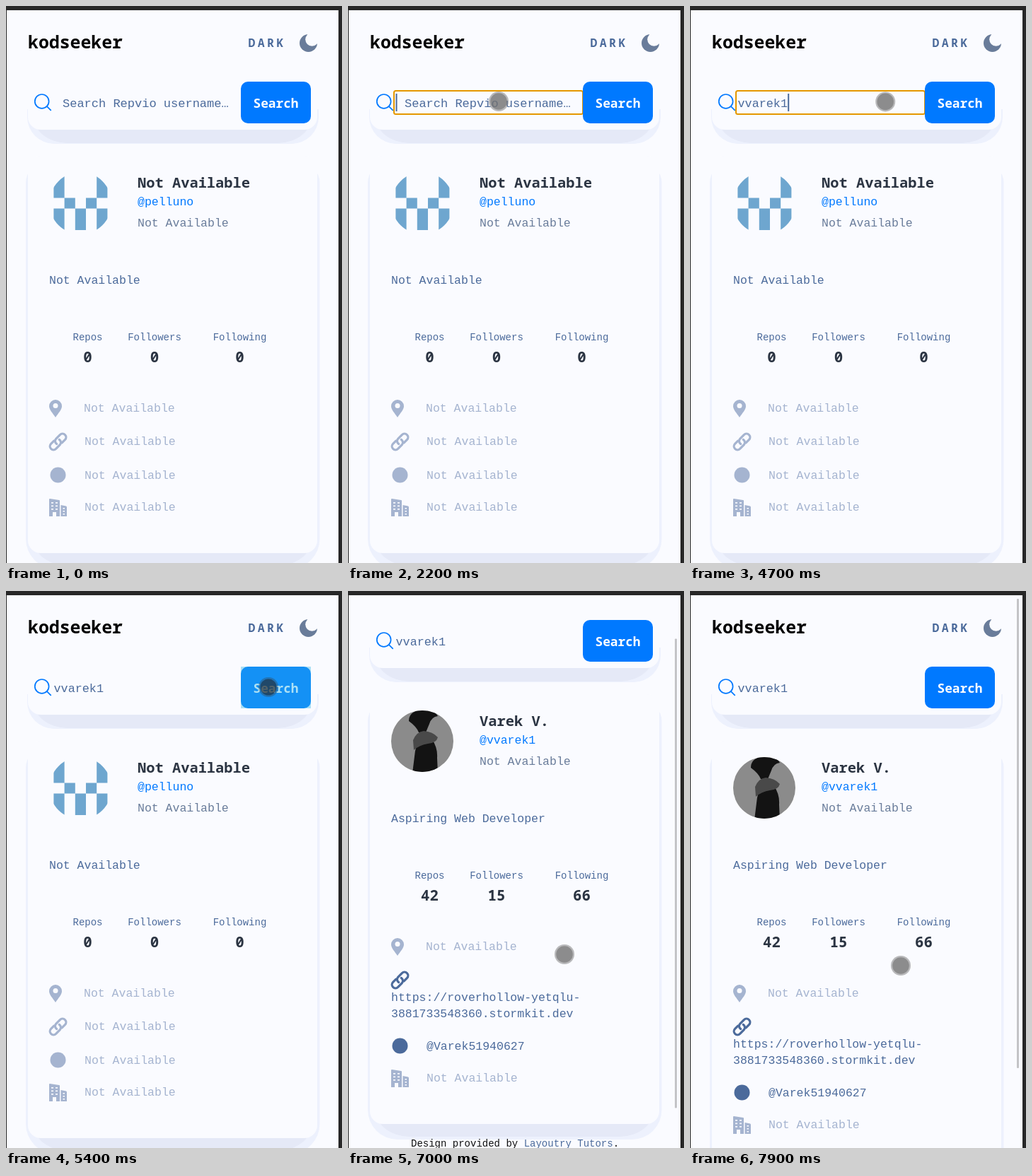
An HTML page with a canvas that plays this animation: 475x788 px, repeating every 8000 ms.

```html
<!DOCTYPE html>
<html lang="en">
<head>
<meta charset="utf-8">
<title>Profile search</title>
<style>
  html, body { margin: 0; width: 100%; height: 100%; overflow: hidden; background: #fafbff; }
  canvas { display: block; }
</style>
</head>
<body>
<canvas id="stage" width="475" height="788"></canvas>
<script>
const ctx = document.getElementById('stage').getContext('2d');
const LOOP = 8000, STEP = 100;
const MONO = '"Liberation Mono", "DejaVu Sans Mono", monospace';
const BOLD = '"Noto Sans Mono", "DejaVu Sans Mono", monospace';
const C = {
  page: '#fafbff', frame: '#272727', blue: '#0079ff', slate: '#4b6a9b', grey: '#697c9a',
  dim: '#a5b4d0', ink: '#2b3442', halo: '#edf1fd', shade: '#e5e9f7', focus: '#e59700'
};
const HANDLE = 'vvarek1';

// Keyed tracks: time followed by values
const POINTER = [
  [600, 421, 411], [1300, 299, 203], [1400, 233, 138], [1500, 219, 134], [1600, 205, 131],
  [1700, 213, 135], [4500, 213, 135], [5000, 371, 136], [6300, 371, 136], [6400, 271, 190],
  [6800, 306, 514], [7400, 306, 514], [7600, 298, 530]
];
const SCROLL = [[6700, 0], [6800, 14], [7200, 118], [7400, 118], [7500, 42], [7600, 0]];

function sample(track, t) {
  if (t <= track[0][0]) return track[0].slice(1);
  for (let i = 1; i < track.length; i++) {
    const a = track[i - 1], b = track[i];
    if (t <= b[0]) {
      const k = (t - a[0]) / (b[0] - a[0]);
      return a.slice(1).map((v, j) => v + (b[j + 1] - v) * k);
    }
  }
  return track[track.length - 1].slice(1);
}

const within = (t, a, b) => t >= a && t < b;

function text(str, x, y, size, color, weight = 400, align = 'left') {
  ctx.font = `${weight} ${size}px ${weight > 400 ? BOLD : MONO}`;
  ctx.textAlign = align;
  ctx.fillStyle = color;
  ctx.fillText(str, x, y);
}

function rect(x, y, w, h, color) {
  ctx.fillStyle = color;
  ctx.fillRect(x, y, w, h);
}

function round(x, y, w, h, r, color) {
  ctx.fillStyle = color;
  ctx.beginPath();
  ctx.roundRect(x, y, w, h, r);
  ctx.fill();
}

function disc(x, y, r, color) {
  ctx.fillStyle = color;
  ctx.beginPath();
  ctx.arc(x, y, r, 0, Math.PI * 2);
  ctx.fill();
}

function shape(d, color) {
  ctx.fillStyle = color;
  ctx.fill(new Path2D(d));
}

// Inner, darker step of a card's shadow, ending at the given bottom edge
function shade(bottom) {
  const corner = { x: 50, y: 42 };
  round(37, bottom - 64, 397, 64, [0, 0, corner, corner], C.shade);
}

function header() {
  text('kodseeker', 31, 60, 24.8, '#000', 600);
  ctx.letterSpacing = '3.4px';
  text('DARK', 342.5, 58, 16.5, C.slate, 700);
  ctx.letterSpacing = '0px';
  disc(427.5, 52.5, 12.5, C.grey);
  disc(432.6, 47.3, 9.4, C.page);
  disc(434.5, 45, 9.6, C.page);
}

function searchBar(t) {
  round(30, 120, 412, 75, [0, 0, 38, 38], C.halo);
  shade(194);
  round(31, 100, 409, 75, 18, C.page);
  rect(28, 96, 416, 50, C.page);

  ctx.strokeStyle = C.blue;
  ctx.lineWidth = 1.7;
  ctx.beginPath();
  ctx.arc(50.7, 134.9, 9.9, 0, Math.PI * 2);
  ctx.moveTo(57.7, 141.9);
  ctx.lineTo(63.7, 147.8);
  ctx.stroke();

  if (within(t, 2000, 5400)) {
    ctx.strokeStyle = C.focus;
    ctx.lineWidth = 2;
    ctx.beginPath();
    ctx.roundRect(65, 120, 267, 33, 2.5);
    ctx.stroke();
  }

  let typed = t < 3000 ? 0 : Math.min(6, Math.floor((t - 3000) / 100) + 1);
  if (t >= 3700) typed = HANDLE.length;
  if (typed) text(HANDLE.slice(0, typed), 67.5, 143, 16.8, C.slate);
  else text('Search Repvio username…', 80, 143, 17, C.slate);

  const caret = within(t, 2200, 2600) || within(t, 3000, 4200) || within(t, 4600, 5100);
  if (caret) rect(67.5 + typed * 10.1, 124, 2, 25, C.slate);

  round(332, 107, 99, 59, 10, C.blue);
  text('Search', 381.5, 144, 17.8, '#fff', 800, 'center');
  if (within(t, 5400, 5500)) rect(332, 107, 99, 59, 'rgba(51,181,229,.4)');
}

function identicon() {
  const rows = ['10001', '10001', '01010', '10101', '10101'];
  ctx.save();
  ctx.beginPath();
  ctx.arc(105.3, 279, 44, 0, Math.PI * 2);
  ctx.clip();
  ctx.fillStyle = '#6ea6cf';
  ctx.beginPath();
  rows.forEach((row, j) => [...row].forEach((on, i) => {
    if (on === '1') ctx.rect(67.4 + i * 15.2, 241 + j * 15.2, 15.2, 15.2);
  }));
  ctx.fill();
  ctx.restore();
}

function portrait() {
  ctx.save();
  ctx.beginPath();
  ctx.ellipse(105, 278.5, 44, 43.5, 0, 0, Math.PI * 2);
  ctx.clip();
  rect(60, 234, 90, 90, '#8b8b8b');
  shape('M91 324 L94 300 Q95 286 101 276 L119 276 Q127 288 126 302 L127 324Z', '#131313');
  shape('M86 250 Q86 236 104 234 Q122 233 127 243 Q118 244 115 254 L110 266 L100 266 Q97 258 86 250Z', '#131313');
  shape('M92 277 Q97 265 107 264 Q120 265 127 273 Q125 281 113 282 Q101 284 93 291Z', '#494949');
  ctx.restore();
}

function pin(y, color) {
  shape(`M70 ${y + 25} C66 ${y + 19} 61 ${y + 14} 61 ${y + 9} A9 9 0 0 1 79 ${y + 9} C79 ${y + 14} 74 ${y + 19} 70 ${y + 25}Z`, color);
  disc(70, y + 8.5, 3.5, C.page);
}

// Two open loops, each the other's half turn
function chain(y, color) {
  ctx.save();
  ctx.translate(73.5, y + 12.5);
  ctx.rotate(-Math.PI / 4);
  ctx.strokeStyle = color;
  ctx.lineWidth = 3.2;
  ctx.lineCap = 'round';
  for (let i = 0; i < 2; i++) {
    ctx.stroke(new Path2D('M-3 -5 H-9 A5 5 0 0 0 -9 5 H-1 A5 5 0 0 0 3.5 -1'));
    ctx.rotate(Math.PI);
  }
  ctx.restore();
}

function building(y, color) {
  shape(`M61 ${y + 1} Q61 ${y} 62 ${y} L75 ${y + 2} Q76 ${y + 2} 76 ${y + 3} V${y + 25} H71 V${y + 19} H66 V${y + 25} H61Z`, color);
  shape(`M77.5 ${y + 9} L85 ${y + 10.5} Q86 ${y + 11} 86 ${y + 12} V${y + 25} H77.5Z`, color);
  for (let j = 0; j < 3; j++) {
    rect(64, y + 5 + j * 4.5, 3, 1.7, C.page);
    rect(70, y + 5 + j * 4.5, 3, 1.7, C.page);
    rect(80.5, y + 13 + j * 4, 2.5, 1.6, C.page);
  }
}

function stat(label, value, x) {
  text(label, x, 473, 14, C.slate, 400, 'center');
  text(value, x, 504, 20.8, C.ink, 700, 'center');
}

function profile(t) {
  const loaded = t >= 5900;
  const none = 'Not Available';
  const shift = loaded ? 46 : 0;
  const live = loaded ? C.slate : C.dim;
  const bottom = 774 + shift;

  round(28, 222, 415.5, bottom + 22 - 222, [28, 28, 42, 42], C.halo);
  shade(bottom + 18);
  round(31, 212, 409, bottom - 212, 18, C.page);

  if (t >= 6000) portrait();
  else identicon();
  text(loaded ? 'Varek V.' : none, 186, 257, 20.4, C.ink, 600);
  text(loaded ? '@' + HANDLE : '@pelluno', 186, 282, 16.5, C.blue);
  text(none, 186, 312, 16.5, C.grey);
  text(loaded ? 'Aspiring Web Developer' : none, 61, 393, 16.5, C.slate);

  stat('Repos', loaded ? '42' : '0', 115.5);
  stat('Followers', loaded ? '15' : '0', 210);
  stat('Following', loaded ? '66' : '0', 330.5);

  pin(557, C.dim);
  text(none, 110, 574, 16.5, C.dim);
  chain(604, live);
  if (loaded) {
    text('https://roverhollow-yetqlu-', 61, 646, 16.5, C.slate);
    text('3881733548360.stormkit.dev', 61, 669, 16.5, C.slate);
  } else {
    text(none, 111, 621, 16.5, C.dim);
  }
  disc(73.5, 663.5 + shift, 11, live);
  text(loaded ? '@Varek51940627' : none, 111, 669 + shift, 16.5, live);
  building(697 + shift, C.dim);
  text(none, 111, 714 + shift, 16.5, C.dim);

  creditLine('Design provided by ', 'Layoutry Tutors', 89, 806 + shift);
  creditLine('Built by ', '@' + HANDLE, 160, 837 + shift);
}

function creditLine(lead, link, x, y) {
  text(lead, x, y, 14, '#111');
  x += ctx.measureText(lead).width;
  text(link, x, y, 14, C.slate);
  text('.', x + ctx.measureText(link).width, y, 14, '#111');
}

function pointer(t) {
  if (t < 600) return;
  const [x, y] = sample(POINTER, t);
  if (within(t, 2000, 2200) || within(t, 5400, 5500)) {
    disc(x, y, 14, 'rgba(60,60,60,.35)');
    disc(x, y, 11.5, 'rgba(30,30,30,.5)');
  } else {
    disc(x, y, 14, 'rgba(120,120,120,.5)');
    disc(x, y, 11.8, 'rgba(110,110,110,.6)');
  }
}

function draw(t) {
  const [scroll] = sample(SCROLL, t);
  rect(0, 0, 475, 788, C.page);
  ctx.save();
  ctx.translate(0, -scroll);
  header();
  searchBar(t);
  profile(t);
  ctx.restore();
  if (t >= 6800) round(462, 11 + scroll * 101 / 118, 3, 664, 1, '#c3c3c6');
  rect(0, 0, 475, 6, C.frame);
  rect(0, 0, 1, 788, C.frame);
  rect(470, 0, 5, 788, C.frame);
  pointer(t);
}

const start = performance.now();
function tick() {
  const t = (performance.now() - start) % LOOP;
  draw(Math.floor(t / STEP) * STEP);
  requestAnimationFrame(tick);
}
tick();
</script>
</body>
</html>
```
